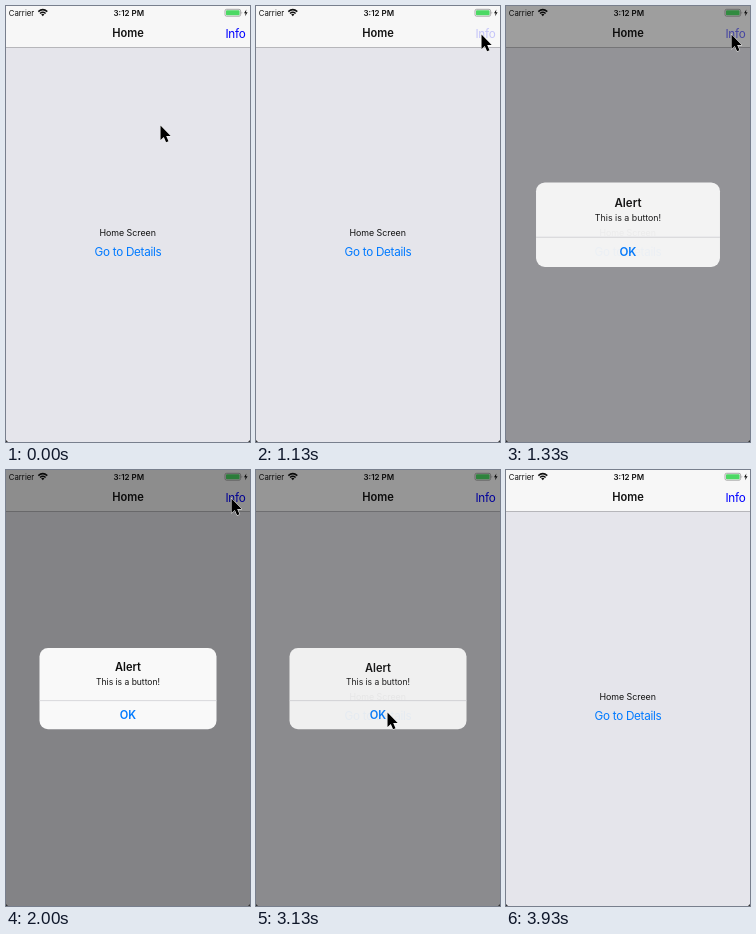
Recreate the animation shown at these times as an HTML page. Size 244 px wide and 436 px high, loop 4.67 s.

```html
<!DOCTYPE html>
<html lang="en">
<head>
<meta charset="utf-8">
<style>
  html, body { margin: 0; width: 100%; height: 100%; overflow: hidden; background: #e5e5eb; }
  svg { display: block; width: 244px; height: 436px; }
  text { font: 8.9px Inter, "Liberation Sans", sans-serif; fill: #111; text-anchor: middle; }
  .bold { font-weight: 600; font-size: 11.1px; }
  .status { font-size: 7.8px; }
  .link { font-size: 11.7px; letter-spacing: -.28px; fill: #007aff; }
  #info { fill: #00f; text-anchor: start; }
</style>
</head>
<body>
<svg viewBox="0 0 244 436">
  <rect width="244" height="436" fill="#e5e5eb"/>
  <rect width="244" height="41" fill="#f7f7f7"/>
  <rect y="41" width="244" height="1" fill="#b6b6ba"/>

  <text class="status" x="15.5" y="10">Carrier</text>
  <g fill="none" stroke="#111" stroke-width="1.5">
    <path d="M32.3 5.6Q36.8 1.6 41.3 5.6M34 7.5Q36.8 5 39.6 7.5"/>
    <path d="M35.2 8.5Q36.8 7.2 38.4 8.5L36.8 10.2Z" fill="#111" stroke="none"/>
  </g>
  <text class="status bold" style="font-size:8px" x="122.8" y="10">3:12 PM</text>
  <rect x="219" y="3.3" width="15.6" height="6.9" rx="1.6" fill="none" stroke="#8a8a8a" stroke-width=".7"/>
  <rect x="220" y="4.3" width="13.6" height="4.9" rx=".8" fill="#4cd964"/>
  <path d="M235.6 5.5q1.4 1.2 0 2.5z" fill="#8a8a8a"/>
  <path d="M240.4 3.4L238 7.2h1.6l-.5 3.1 2.5-4h-1.7z" fill="#111"/>

  <text class="bold" x="122" y="31">Home</text>
  <text class="link" id="info" x="219.5" y="32">Info</text>
  <text x="121.7" y="230" letter-spacing="-.05">Home Screen</text>
  <text class="link" x="122" y="249.5">Go to Details</text>

  <rect id="dim" width="244" height="436"/>
  <g id="alert">
    <rect x="33.5" y="178" width="177" height="81.3" rx="8.5" fill="#f9f9f9"/>
    <path id="press" d="M33.5 231h177v19.8a8.5 8.5 0 0 1-8.5 8.5h-160a8.5 8.5 0 0 1-8.5-8.5z" fill="#e8e8eb"/>
    <rect x="33.5" y="230.3" width="177" height=".8" fill="#d0d0d4"/>
    <text class="bold" x="122" y="201.5">Alert</text>
    <text style="font-size:8.5px" x="122" y="214.7">This is a button!</text>
    <text class="bold" style="fill:#007aff" x="122" y="249">OK</text>
  </g>
  <path d="M0 434v2h2zM244 434v2h-2z" fill="#333"/>
  <path id="cursor" d="M0 0V14.5L3.3 11.4 5.6 16.8 8 15.8 5.7 10.5H10.2Z" stroke="#fff" stroke-width="1" paint-order="stroke"/>
</svg>
<script>
const LOOP = 4670;
const [info, dim, alertBox, press, cursor] =
  ["info", "dim", "alert", "press", "cursor"].map(id => document.getElementById(id));

const ramp = (t, from, to) => Math.min(1, Math.max(0, (t - from) / (to - from)));
const smooth = u => u * u * (3 - 2 * u);
const ease = (t, from, to) => smooth(ramp(t, from, to));

// Pointer stops: time, x, y
const stops = [
  [20, 154.5, 119.5], [470, 225.5, 28.5], [2150, 225.5, 28.5], [2400, 148.5, 225.5],
  [2500, 126, 252], [2600, 131.5, 242.5], [3400, 131.5, 242.5], [3730, 250, 254]
];

function pointerAt(t) {
  let [, x, y] = stops[0];
  for (let i = 1; i < stops.length; i++) {
    const [t0, x0, y0] = stops[i - 1], [t1, x1, y1] = stops[i];
    const u = ease(t, t0, t1);
    x += (x1 - x0) * u;
    y += (y1 - y0) * u;
  }
  return [x, y];
}

function draw(t) {
  const age = t - 1230;
  const decay = tau => age < 0 ? 1 : Math.exp(-age / tau);
  const visible = 1 - ease(t, 3090, 3330);
  const scale = 1 + .2 * decay(62);

  info.style.opacity = 1 - .8 * (ramp(t, 960, 1110) - ramp(t, 1240, 1440));
  dim.style.opacity = .43 * (1 - decay(55)) * visible;
  alertBox.style.opacity = (1 - decay(35)) * visible;
  alertBox.setAttribute("transform", `translate(122 218.6) scale(${scale}) translate(-122 -218.6)`);
  press.style.opacity = t >= 2870 && t < 3060 ? 1 : 0;
  cursor.setAttribute("transform", `translate(${pointerAt(t)})`);
}

const start = performance.now();
function tick() {
  draw((performance.now() - start) % LOOP);
  requestAnimationFrame(tick);
}
tick();
</script>
</body>
</html>
```
